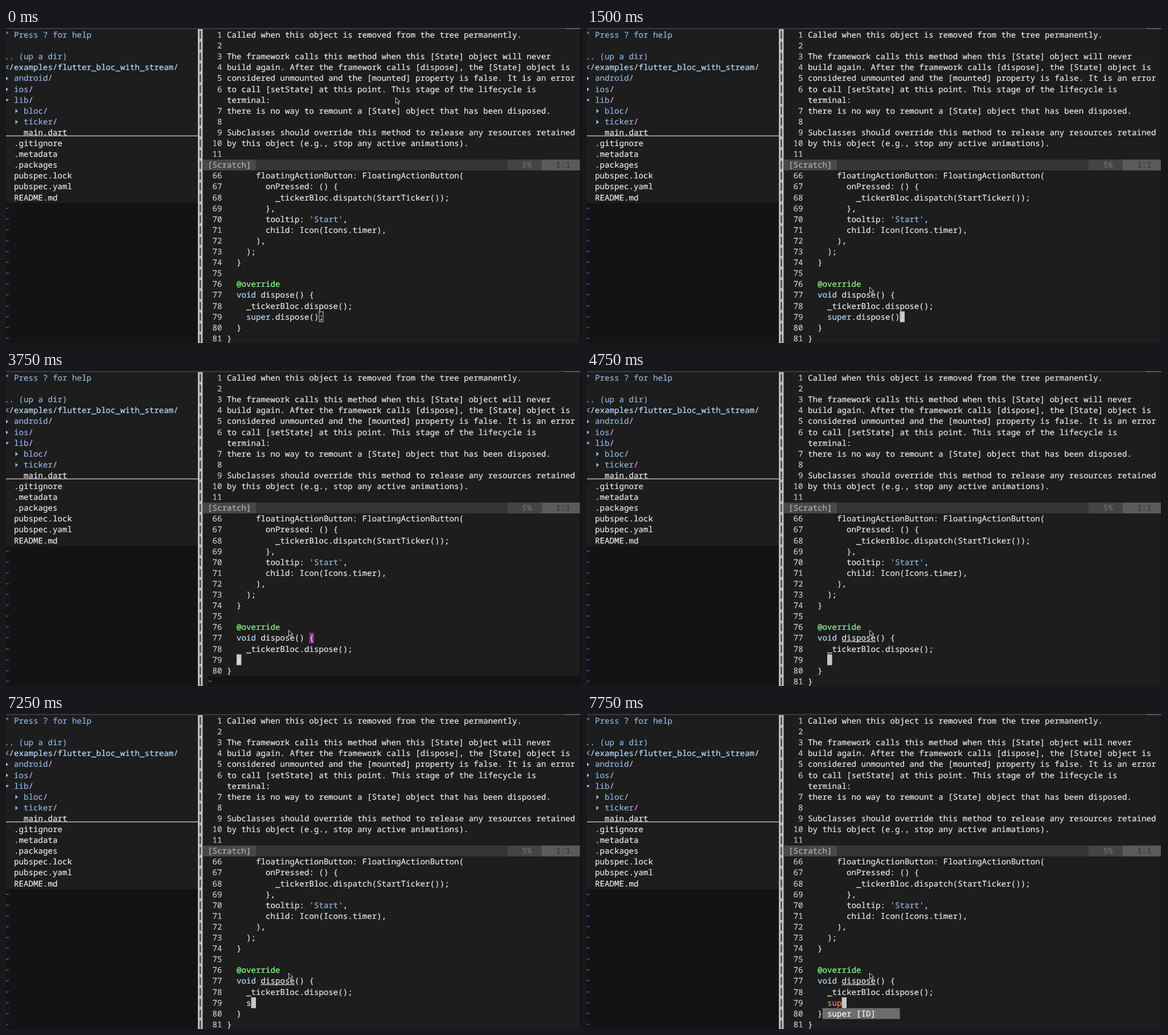
An HTML page for the animation above (8000 ms loop, 1010 px wide and 555 px high).

```html
<!DOCTYPE html>
<html lang="en">
<head>
<meta charset="utf-8">
<title>Terminal editor</title>
<style>
  html, body { margin: 0; width: 100%; height: 100%; overflow: hidden; background: #1d1d1d; }
  svg { display: block; width: 100%; height: 100%; }
  text {
    font: 14.167px "Noto Sans Mono", "DejaVu Sans Mono", monospace;
    white-space: pre;
    text-rendering: geometricPrecision;
    stroke-width: .2px;
  }
</style>
</head>
<body>
<svg id="stage" viewBox="0 0 1010 555">
  <g id="screen"></g>
  <g id="live"></g>
  <path id="pointer" d="M.5 .5V10.6L3 8.4L4.9 12.6L6.6 11.8L4.8 7.8H8.2Z"
        fill="#111" stroke="#d8d8d8" stroke-width="1"/>
</svg>
<script>
const COL = 8.5, ROW = 19.1, TOP = 2.6, LEFT_X = -3, RIGHT_X = 388;
const C = {
  bg: '#1d1d1d', dark: '#131313', text: '#e9e9e9', number: '#c6c6c6',
  blue: '#8fb5e2', sky: '#b8deff', pink: '#f29fee', tilde: '#4a72ee',
  green: '#8cff8c', orange: '#f98d5e', block: '#c6c6c6', menu: '#6d6d6d'
};
const screen = document.getElementById('screen');
const live = document.getElementById('live');
const pointer = document.getElementById('pointer');
let layer = screen;

function add(tag, attrs, content) {
  const el = document.createElementNS('http://www.w3.org/2000/svg', tag);
  for (const key in attrs) el.setAttribute(key, attrs[key]);
  if (content) el.textContent = content;
  layer.append(el);
}
const rowY = row => TOP + row * ROW;
const colX = col => RIGHT_X + col * COL;
const rect = (x, y, width, height, fill) => add('rect', { x, y, width, height, fill });
const print = (x, row, str, fill = C.text) =>
  add('text', { x, y: rowY(row) + 14.4, fill, stroke: fill }, str);
const left = (row, col, str, fill) => print(LEFT_X + col * COL, row, str, fill);
const code = (row, col, str, fill) => print(colX(col), row, str, fill);
const cells = (row, col, count, fill) => rect(colX(col), rowY(row), count * COL, ROW, fill);
const number = (row, n) => code(row, -1 - String(n).length, String(n), C.number);

function folder(row, col, name, open) {
  const x = LEFT_X + col * COL, y = rowY(row) + 10;
  add('path', {
    d: open ? `M${x + 1} ${y - 2}h7l-3.5 4.5z` : `M${x + 2.5} ${y - 4}v8l4.5 -4z`,
    fill: C.blue
  });
  left(row, col + 2, name, C.blue);
  left(row, col + 2 + name.length, '/', C.pink);
}

function drawTree() {
  rect(0, rowY(16), 337, 555, C.dark);
  left(0, 0, '" Press ? for help', C.blue);
  left(2, 0, '.. (up a dir)', C.blue);
  left(3, 0, '</examples/flutter_bloc_with_stream/', C.sky);
  folder(4, 0, 'android');
  folder(5, 0, 'ios');
  folder(6, 0, 'lib', true);
  folder(7, 2, 'bloc');
  folder(8, 2, 'ticker');
  left(9, 4, 'main.dart');
  ['.gitignore', '.metadata', '.packages', 'pubspec.lock', 'pubspec.yaml', 'README.md']
    .forEach((name, i) => left(10 + i, 2, name));
  for (let row = 16; row < 29; row++) left(row, 0, '~', C.tilde);
  rect(0, 189.5, 337, 1.2, '#dedede');
}

function drawDivider() {
  rect(337, 2, 8.5, 553, '#bcbcbc');
  for (let row = 0; row < 29; row++) rect(340.4, rowY(row) + 2.5, 1.8, 14, '#262626');
}

function drawDocs() {
  const lines = [
    [1, 'Called when this object is removed from the tree permanently.'],
    [2, ''],
    [3, 'The framework calls this method when this [State] object will never'],
    [4, 'build again. After the framework calls [dispose], the [State] object is'],
    [5, 'considered unmounted and the [mounted] property is false. It is an error'],
    [6, 'to call [setState] at this point. This stage of the lifecycle is'],
    ['', 'terminal:'],
    [7, 'there is no way to remount a [State] object that has been disposed.'],
    [8, ''],
    [9, 'Subclasses should override this method to release any resources retained'],
    [10, 'by this object (e.g., stop any active animations).'],
    [11, '']
  ];
  lines.forEach(([n, str], row) => { number(row, n); code(row, 0, str); });
}

function drawStatus() {
  cells(12, -5, 11, '#484848');
  cells(12, 6, 52, '#353535');
  cells(12, 58, 7, '#444');
  cells(12, 65, 8, '#5a5a5a');
  code(12, -4, '[Scratch]', '#b0b0b0');
  code(12, 61, '5%', '#707070');
  code(12, 68, '1:1', '#353535');
}

function drawCode() {
  const lines = [
    '      floatingActionButton: FloatingActionButton(',
    '        onPressed: () {',
    '          _tickerBloc.dispatch(StartTicker());',
    '        },',
    '        tooltip:        ,',
    '        child: Icon(Icons.timer),',
    '      ),',
    '    );',
    '  }',
    '', '',
    '       dispose() {',
    '    _tickerBloc.dispose();'
  ];
  lines.forEach((str, i) => { number(13 + i, 66 + i); code(13 + i, 0, str); });
  code(17, 17, "'Start'", C.blue);
  code(23, 2, '@override', C.green);
  code(24, 2, 'void', C.sky);
}

function block(row, col, char) {
  cells(row, col, 1, C.block);
  if (char) code(row, col, char, '#f2f2f2');
}
function closeBraces(row) {
  number(row, 53 + row);
  code(row, 2, '}');
  number(row + 1, 54 + row);
  code(row + 1, 0, '}');
}
function menu(row, width, items) {
  items.forEach((item, i) => {
    cells(row + i, 3, width, C.menu);
    code(row + i, 4, item, '#fff');
  });
}
const underline = () => rect(colX(7), 476.2, 7 * COL, 1.2, C.text);

function finished(hollow) {
  number(26, 79);
  code(26, 4, 'super', C.sky);
  code(26, 9, '.dispose();');
  closeBraces(27);
  if (hollow) {
    add('rect', { x: 550, y: 500, width: 7, height: 17.5, fill: 'none', stroke: '#d0d0d0' });
  } else block(26, 19, ';');
}
function deleted(onBrace, warned) {
  closeBraces(26);
  rect(354, rowY(28), 654, 20, C.dark);
  print(354, 28, '~', C.tilde);
  if (onBrace) {
    cells(24, 17, 1, '#862f86');
    code(24, 17, '{');
    block(26, 2, '}');
  } else block(25, 2);
  if (warned) underline();
}
function typing(word, color) {
  number(26, 79);
  code(26, 4, word, color);
  closeBraces(27);
  underline();
  block(26, 4 + word.length);
}

// start time, pointer x and y, drawing of the changing part
const steps = [
  [0, 684, 122, () => finished(true)],
  [500, 496, 425, () => finished(true)],
  [750, 496, 448, () => finished(true)],
  [1000, 496, 456, () => finished(true)],
  [1500, 496, 456, () => finished(false)],
  [3750, 496, 456, () => deleted(true)],
  [4250, 496, 456, () => deleted(false)],
  [4500, 496, 456, () => deleted(false, true)],
  [4750, 496, 456, () => typing('')],
  [7250, 496, 456, () => typing('s')],
  [7500, 496, 456, () => {
    typing('su');
    menu(24, 21, ['super          [ID]', 'StatefulWidget [ID]']);
  }],
  [7750, 496, 456, () => {
    typing('sup', C.orange);
    menu(27, 16, ['super [ID]']);
  }]
];

rect(0, 0, 1010, 555, C.bg);
drawTree();
drawDivider();
drawDocs();
drawStatus();
drawCode();
rect(0, 0, 1010, 1.6, '#424244');
rect(982, 0, 26, 1.6, '#626264');
rect(1008.3, 2, 1.7, 553, '#101010');
layer = live;

const start = performance.now();
let shown;
function frame() {
  const time = Math.max(0, performance.now() - start) % 8000;
  const step = steps.findLast(([at]) => at <= time);
  if (step !== shown) {
    shown = step;
    const [, x, y, draw] = step;
    live.replaceChildren();
    draw();
    pointer.setAttribute('transform', `translate(${x} ${y})`);
  }
  requestAnimationFrame(frame);
}
frame();
</script>
</body>
</html>
```
